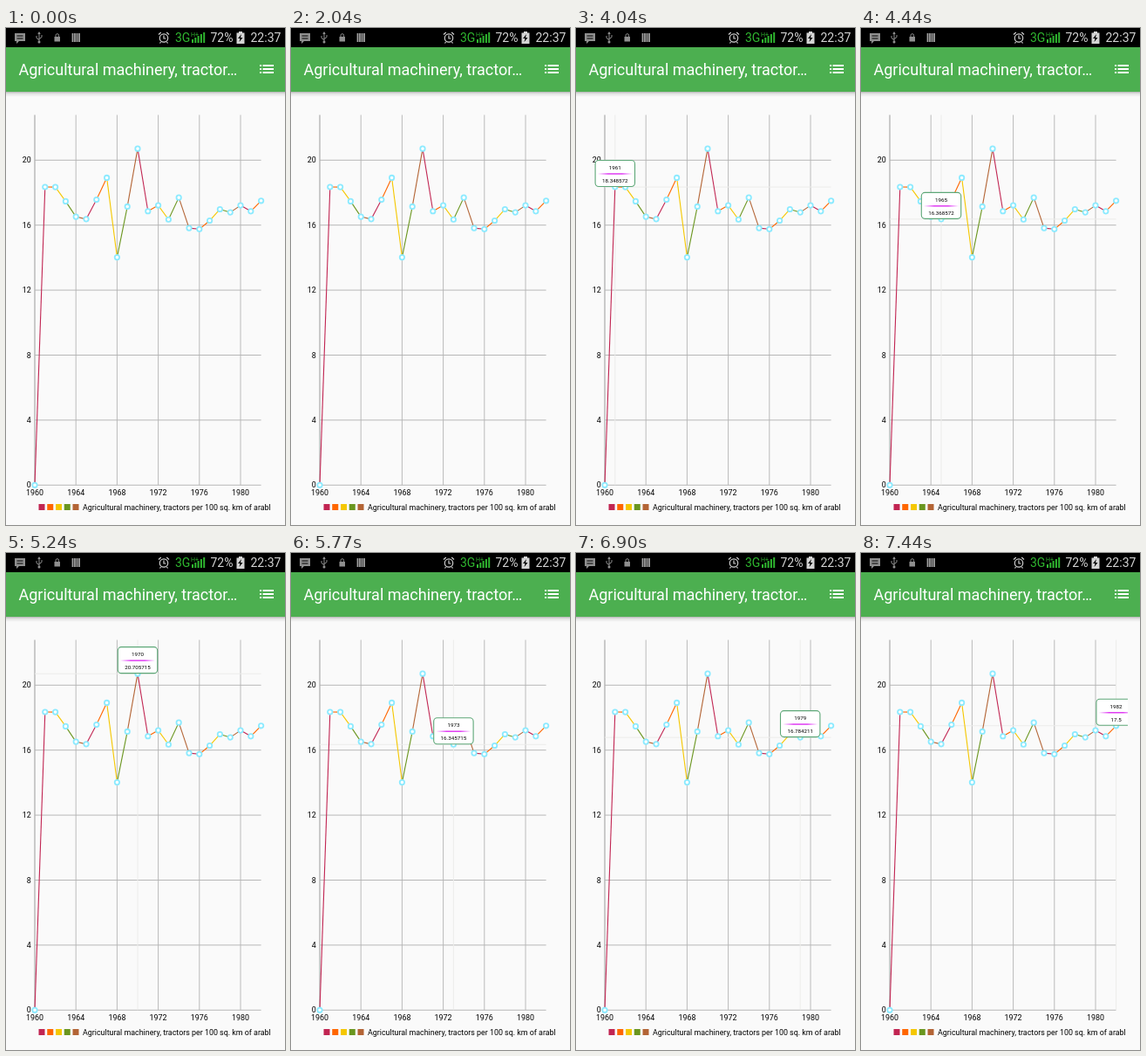
An HTML page for the animation above (8000 ms loop, 320 by 569 pixels).

```html
<!DOCTYPE html>
<html lang="en">
<head>
<meta charset="utf-8">
<title>Line chart with marker</title>
<style>
  html, body { margin: 0; width: 100%; height: 100%; overflow: hidden; background: #fafafa; }
  svg { display: block; width: 100%; height: 100%; font-family: Roboto, sans-serif; }
  .axis { font-size: 8.89px; }
  .tip { font-size: 6.22px; text-anchor: middle; }
</style>
</head>
<body>
<svg viewBox="0 0 320 569">
  <defs>
    <linearGradient id="shade" x2="0" y2="1">
      <stop stop-color="#b4b4b4"/><stop offset=".35" stop-color="#e2e2e2"/><stop offset="1" stop-color="#fafafa"/>
    </linearGradient>
    <linearGradient id="rule">
      <stop stop-color="#e040fb" stop-opacity="0"/><stop offset=".3" stop-color="#df3cf2"/>
      <stop offset=".7" stop-color="#df3cf2"/><stop offset="1" stop-color="#e040fb" stop-opacity="0"/>
    </linearGradient>
    <clipPath id="view"><rect x="14" y="80" width="292" height="470"/></clipPath>
  </defs>
  <rect width="320" height="569" fill="#fafafa"/>
  <rect y="73" width="320" height="6" fill="url(#shade)"/>
  <rect y="22" width="320" height="51" fill="#4caf50"/>
  <rect width="320" height="22" fill="#000"/>

  <!-- status bar -->
  <g fill="#8f8f8f" stroke="none">
    <path d="M10 6h12v9h-7l-3 3v-3h-2z"/>
    <path d="M12.5 9h7M12.5 12h7" stroke="#000"/>
    <path d="M38 5v11M35 9v2.5l3 2M41 8v2.5l-3 2" fill="none" stroke="#8f8f8f"/>
    <path d="M36.300 7l1.700-3 1.700 3z"/><circle cx="38" cy="16" r="1.500"/>
    <rect x="55.500" y="10" width="6.500" height="5.500"/>
    <path d="M57 10v-1.500a1.800 1.800 0 0 1 3.600 0V10" fill="none" stroke="#8f8f8f"/>
    <path d="M76.500 6v10M79 6v10M81.500 6v10M84 6v10" stroke="#a0a0a0" stroke-width="1.800"/>
  </g>
  <g fill="none" stroke="#d0d0d0" stroke-width="1.200">
    <circle cx="181" cy="11.500" r="4.700"/>
    <path d="M181 8.500v3.500h2.500M175 7.500l2.800-2.500M187 7.500l-2.800-2.500M177.500 16l-1 1.500M184.500 16l1 1.500"/>
  </g>
  <g fill="#2fb62f">
    <text x="194" y="16.300" font-size="14">3G</text>
    <text x="212" y="9.800" font-size="7">H+</text>
    <path d="M213 13h2v4h-2zM216.300 11h2v6h-2zM219.600 9h2v8h-2zM222.900 7h2v10h-2zM226.200 5h2v12h-2z"/>
  </g>
  <g fill="#d4d4d4" font-size="14">
    <text x="234.500" y="16.300">72%</text>
    <text x="280.500" y="16.300">22:37</text>
    <path d="M267 4h4v1.500h2.500V18h-9V5.500h2.500z"/>
    <path d="M270 7l-4 5h2.500l-1 4 4-5H269z" fill="#000"/>
  </g>

  <!-- toolbar -->
  <g fill="#fff">
    <text x="14.500" y="54.200" font-size="18">Agricultural machinery, tractor…</text>
    <path d="M291 42h2v2h-2zM291 46h2v2h-2zM291 50h2v2h-2zM294.500 42H307v2h-12.500zM294.500 46H307v2h-12.500zM294.500 50H307v2h-12.500z"/>
  </g>

  <g id="grid" class="axis"></g>
  <path id="cross" fill="none" stroke="#ececea"/>
  <g id="data"></g>
  <g id="legend"></g>
  <text class="axis" x="88" y="552">Agricultural machinery, tractors per 100 sq. km of arabl</text>

  <g clip-path="url(#view)">
    <g id="marker">
      <rect x="-22.700" y="-30.500" width="45.400" height="30" rx="4" fill="#fff" stroke="#5da777" stroke-width="1.100"/>
      <rect x="-20" y="-15.800" width="40" height="1.500" fill="url(#rule)"/>
      <text id="year" class="tip" y="-20"></text>
      <text id="amount" class="tip" y="-5.200"></text>
    </g>
  </g>
</svg>
<script>
const LOOP = 8000;
const FIRST_YEAR = 1960;
const COLORS = ['#c12552', '#ff6600', '#f5c700', '#6a961f', '#b36435'];
const VALUES = [
  0, 18.348572, 18.342857, 17.468571, 16.517143, 16.368572, 17.567142, 18.917143,
  14.017143, 17.142857, 20.705715, 16.857143, 17.217142, 16.345715, 17.697144,
  15.817142, 15.752381, 16.278948, 16.978947, 16.784211, 17.215789, 16.852631, 17.5
];
// Moment at which the marker jumps to each successive year.
const JUMPS = [
  2970, 4040, 4100, 4170, 4300, 4440, 4570, 4640, 4700, 4840, 5040, 5440,
  5570, 5770, 5970, 6170, 6370, 6570, 6700, 6900, 7070, 7240, 7370
];
const LEFT = 33, RIGHT = 292.6, TOP = 99.5, BOTTOM = 523.3;

const el = id => document.getElementById(id);
const px = i => LEFT + 11.8 * i;
const py = value => BOTTOM - 18.6 * value;

function add(parent, tag, attrs, text = '') {
  const node = document.createElementNS('http://www.w3.org/2000/svg', tag);
  for (const name in attrs) node.setAttribute(name, attrs[name]);
  node.textContent = text;
  el(parent).append(node);
}

function line(parent, x1, y1, x2, y2, stroke, width) {
  add(parent, 'line', { x1, y1, x2, y2, stroke, 'stroke-width': width });
}

for (let i = 0; i <= 20; i += 4) {
  const x = px(i), y = py(i);
  line('grid', x, TOP, x, BOTTOM, i ? '#b5b5b5' : '#909090', 0.9);
  line('grid', LEFT, y, RIGHT, y, '#b0b0b0', 0.9);
  add('grid', 'text', { x, y: 534.6, 'text-anchor': 'middle' }, FIRST_YEAR + i);
  add('grid', 'text', { x: 28.8, y: y + 3, 'text-anchor': 'end' }, i);
}

VALUES.slice(1).forEach((value, i) =>
  line('data', px(i), py(VALUES[i]), px(i + 1), py(value), COLORS[i % 5], 1.1));
VALUES.forEach((value, i) =>
  add('data', 'circle', { cx: px(i), cy: py(value), r: 2.7, fill: '#fff', stroke: '#8ceaff', 'stroke-width': 1.8 }));
COLORS.forEach((fill, i) =>
  add('legend', 'rect', { x: 37.5 + 9.75 * i, y: 545, width: 7, height: 7, fill }));

function draw(now) {
  const time = now % LOOP;
  const i = JUMPS.filter(jump => jump <= time).length - 1;
  const shown = i >= 0 ? 'visible' : 'hidden';
  el('marker').setAttribute('visibility', shown);
  el('cross').setAttribute('visibility', shown);
  if (i >= 0) {
    const x = px(i), y = py(VALUES[i]);
    el('marker').setAttribute('transform', `translate(${x} ${y})`);
    el('cross').setAttribute('d', `M${x} ${TOP}V${BOTTOM}M${LEFT} ${y}H${RIGHT}`);
    el('year').textContent = FIRST_YEAR + i;
    el('amount').textContent = VALUES[i];
  }
  requestAnimationFrame(draw);
}
draw(performance.now());
</script>
</body>
</html>
```
